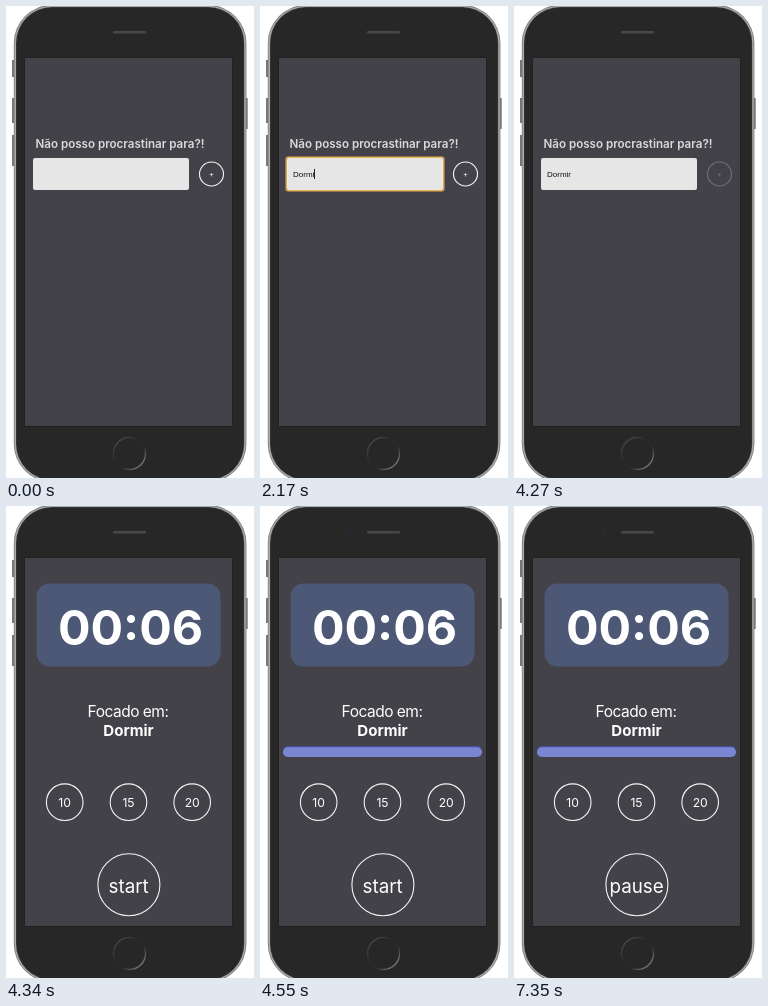
These frames come from a looping animation (248x472 px, 8 s). An HTML page:

```html
<!DOCTYPE html>
<html lang="pt">
<head>
<meta charset="utf-8">
<title>Focus timer</title>
<style>
  html, body { margin: 0; width: 100%; height: 100%; overflow: hidden; background: #fff; }
  svg { display: block; }
  text { font-family: Inter, "Noto Sans", sans-serif; fill: #fff; }
  .mid { text-anchor: middle; }
  .ring { fill: none; stroke: #f4f4f5; stroke-width: 1.1; }
  .field { font-family: "Liberation Sans", Arial, sans-serif; font-size: 8px; fill: #111; }
</style>
</head>
<body>
<svg width="248" height="472" viewBox="0 0 248 472">
  <defs>
    <linearGradient id="home" x1="0" y1="0" x2="1" y2="1">
      <stop offset="0" stop-color="#555"/>
      <stop offset=".4" stop-color="#292929"/>
      <stop offset=".62" stop-color="#2b2b2b"/>
      <stop offset="1" stop-color="#a0a0a0"/>
    </linearGradient>
  </defs>

  <path d="M7 54v17M7 92v25M7 129v31M240.7 92v31" stroke="#777" stroke-width="2"/>
  <rect x="7.8" y="-1" width="232.6" height="477" rx="38" fill="#7c7c7c"/>
  <rect x="8.6" y="-.2" width="231" height="475.4" rx="37.2" fill="#aaa"/>
  <rect x="10" y="1" width="228.2" height="473" rx="36" fill="#383838"/>
  <rect x="10.8" y="1.8" width="226.6" height="471.4" rx="35.2" fill="#272727"/>
  <circle cx="89.5" cy="26" r="1.6" fill="#2a2a48"/>
  <rect x="107" y="25" width="33" height="2.6" rx="1.3" fill="#484848"/>
  <circle cx="123.5" cy="447.5" r="16" fill="none" stroke="url(#home)" stroke-width="1.4"/>
  <rect x="18.5" y="51.5" width="208" height="369.3" fill="#1c1c1c"/>
  <rect x="19" y="52" width="207" height="368" fill="#434248"/>

  <g id="entry">
    <text x="29.5" y="142" font-size="11.6" font-weight="600" style="fill:#dadadc">Não posso procrastinar para?!</text>
    <rect x="27" y="152" width="156" height="32" rx="2" fill="#e6e6e7"/>
    <g id="focus" fill="none">
      <rect x="26.2" y="151.2" width="157.6" height="33.6" rx="2" stroke="#e3b052" stroke-width="1.4"/>
      <rect x="27.4" y="152.4" width="155.2" height="31.2" rx="1.5" stroke="#f5ead5" stroke-width=".8"/>
    </g>
    <text id="typed" class="field" x="33" y="171"></text>
    <rect id="caret" y="163" width="1" height="10" fill="#222"/>
    <g id="add">
      <circle class="ring" cx="205.5" cy="168" r="12"/>
      <text class="mid" x="205.5" y="170.5" font-size="7.5">+</text>
    </g>
  </g>

  <g id="timer">
    <rect x="30.5" y="77.5" width="184" height="83" rx="13" fill="#4c5875"/>
    <text class="mid" x="124.5" y="138.7" font-size="48.3" font-weight="700">00:06</text>
    <text class="mid" x="122" y="211" font-size="15.5" letter-spacing="-.5">Focado em:</text>
    <text class="mid" x="122.5" y="230" font-size="15.1" font-weight="700">Dormir</text>
    <g id="bar">
      <rect x="23" y="240" width="199" height="11" rx="5" fill="#4450a4"/>
      <rect x="23" y="241.3" width="199" height="9.7" rx="4.8" fill="#7b86d3"/>
    </g>
    <g id="presets"></g>
    <g id="toggle">
      <circle class="ring" cx="122.9" cy="378.7" r="31"/>
      <text id="label" class="mid" x="122.6" y="387" font-size="18.8"></text>
    </g>
  </g>
</svg>
<script>
  const LOOP = 8000;
  const SWITCH = 4340;
  const $ = id => document.getElementById(id);

  // Each table lists [start in ms, value]; the last reached row applies.
  const typing = [[0, ""], [1680, "D"], [1820, "Do"], [1960, "Dor"], [2100, "Dorm"], [2170, "Dormi"], [2660, "Dormir"]];
  const caretOn = [[0, 0], [840, 1], [1330, 0], [1680, 1], [2870, 0]];
  const focusOn = [[0, 0], [840, 1], [2870, 0]];
  const addOpacity = [[0, 1], [4270, .25]];
  const barOpacity = [[0, 0], [4410, .25], [4480, .75], [4550, 1]];
  const toggleOpacity = [[0, 1], [7070, .25], [7140, .35], [7210, .6], [7280, .87], [7350, 1]];
  const labels = [[0, "start"], [7140, "pause"]];

  const at = (steps, t) => steps.filter(([start]) => start <= t).pop()[1];
  const show = (id, on) => { $(id).style.display = on ? "" : "none"; };
  const fade = (id, steps, t) => { $(id).style.opacity = at(steps, t); };
  const write = (id, text) => { if ($(id).textContent !== text) $(id).textContent = text; };

  $("presets").innerHTML = [[58.7, 10], [122.5, 15], [186.2, 20]].map(([x, minutes]) =>
    `<circle class="ring" cx="${x}" cy="296.2" r="18.3"/>
     <text class="mid" x="${x}" y="300.8" font-size="12.2">${minutes}</text>`).join("");

  function draw(t) {
    show("entry", t < SWITCH);
    show("timer", t >= SWITCH);
    show("focus", at(focusOn, t));
    show("caret", at(caretOn, t));
    write("typed", at(typing, t));
    write("label", at(labels, t));
    if (t < SWITCH) $("caret").setAttribute("x", 33 + Math.round($("typed").getComputedTextLength()));
    fade("add", addOpacity, t);
    fade("bar", barOpacity, t);
    fade("toggle", toggleOpacity, t);
  }

  const begin = performance.now();
  function tick() {
    draw((performance.now() - begin) % LOOP);
    requestAnimationFrame(tick);
  }
  tick();
</script>
</body>
</html>
```
